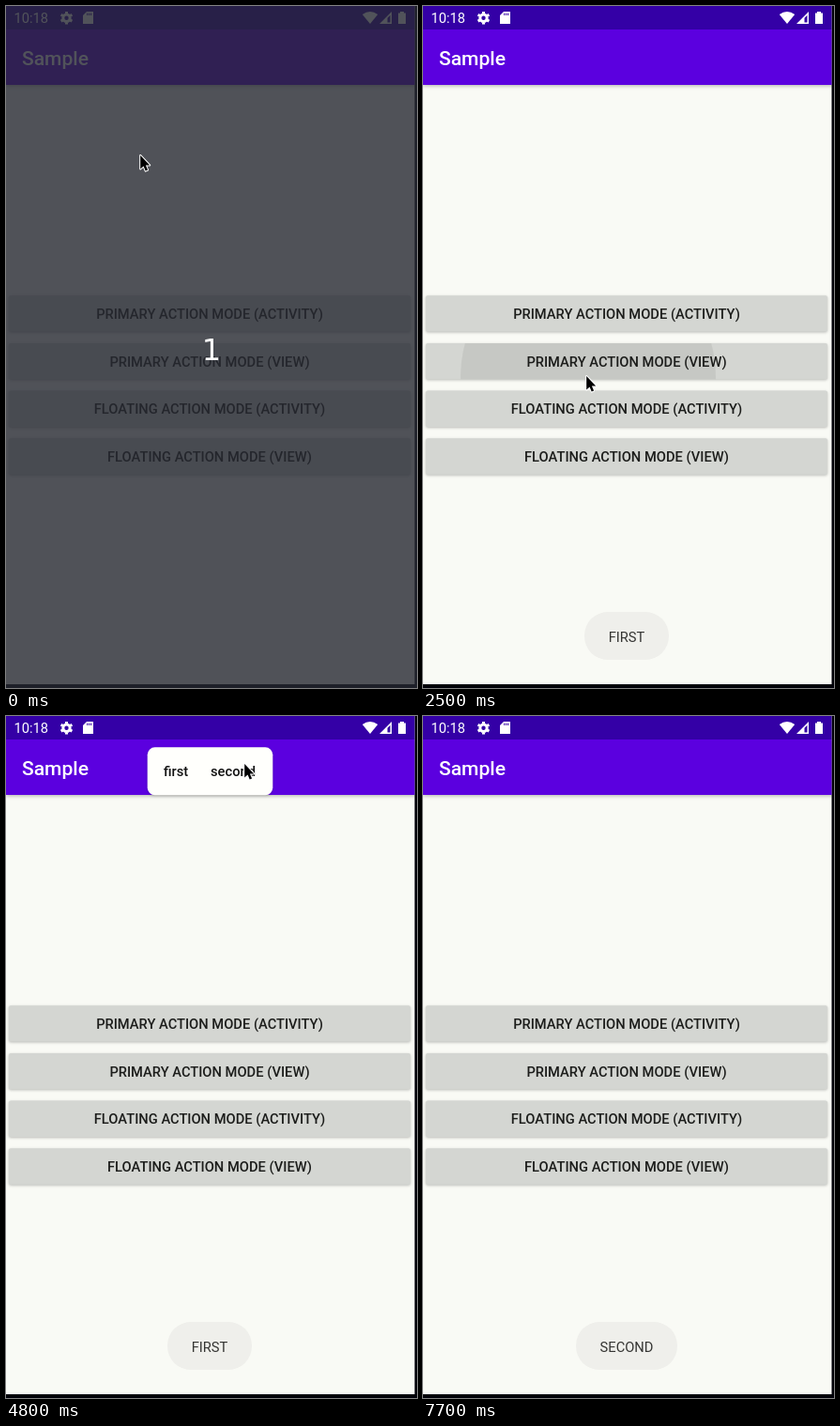
These frames come from a looping animation (438x726 px, 7800 ms). An HTML page with a canvas:

```html
<!DOCTYPE html>
<html lang="en">
<head>
<meta charset="utf-8">
<title>Action mode sample</title>
<style>
  html, body { margin: 0; width: 438px; height: 726px; overflow: hidden; background: #000; }
  canvas { display: block; }
</style>
</head>
<body>
<canvas id="stage" width="438" height="726"></canvas>
<script>
const LOOP = 7800, STEP = 100;
const WIDTH = 435.5, CENTER = 217;
const DP = 1.056;
const BUTTONS = ['PRIMARY', 'FLOATING'].flatMap(kind =>
  ['ACTIVITY', 'VIEW'].map(host => `${kind} ACTION MODE (${host})`));
const buttonTop = i => 308.2 + i * 48 * DP;
const g = document.getElementById('stage').getContext('2d');

// Each pointer move: start, end, x, y of the stop it reaches
const START = { x: 142, y: 158 };
const MOVES = [
  [200, 500, 135, 324],
  [1100, 1300, 215, 38],
  [1500, 1600, 351, 52],
  [2000, 2400, 173, 393],
  [2900, 3100, 353, 80],
  [3500, 3800, 298, 424],
  [4400, 4600, 295, 78],
  [4600, 4800, 253, 50],
  [5100, 5400, 222, 484],
  [6000, 6200, 178, 419],
  [6500, 6900, 406, 6],
  [7000, 7200, 291, 12],
  [7300, 7600, 6, 0],
];

const BACK = new Path2D('M20 12H5M12.7 4.7L5.4 12l7.3 7.3');
const CHECK = new Path2D('M4.1 12.7L9 17.6L20.3 6.3');
const CLOSE = new Path2D('M5.7 5.7L18.3 18.3M18.3 5.7L5.7 18.3');
const CARD = new Path2D('M86 6h7v13h-11v-9z');
const WIFI = new Path2D('M388 19L379.8 9Q388 3 396.2 9z');
const SIGNAL = new Path2D('M411 6V19H398zM409.5 9.8L406.5 12.8V17.5H409.5z');
const BATTERY = new Path2D('M420 6h4v1.5h2V19h-8V7.5h2z');
const ARROW = new Path2D('M0 0V14.4L3.4 11.4L5.5 16.6L7.9 15.6L5.7 10.4H10z');

const ramp = (t, a, b) => Math.min(1, Math.max(0, (t - a) / (b - a)));
const pulse = (t, a, b, c, d) => ramp(t, a, b) * (1 - ramp(t, c, d));
const easeOut = k => 1 - (1 - k) ** 3;

function layer(alpha, draw) {
  if (alpha <= 0) return;
  g.save();
  g.globalAlpha *= alpha;
  draw();
  g.restore();
}

function rect(color, x, y, w, h, r = 0) {
  g.fillStyle = color;
  g.beginPath();
  g.roundRect(x, y, w, h, r);
  g.fill();
}

function raised(blur, alpha, draw) {
  g.save();
  g.shadowColor = `rgba(0,0,0,${alpha})`;
  g.shadowBlur = blur;
  g.shadowOffsetY = 1;
  draw();
  g.restore();
}

function disc(color, x, y, r) {
  g.fillStyle = color;
  g.beginPath();
  g.arc(x, y, r, 0, 7);
  g.fill();
}

function clippedDisc(color, x, y, r, box) {
  g.save();
  g.beginPath();
  g.roundRect(...box);
  g.clip();
  disc(color, x, y, r);
  g.restore();
}

function text(str, x, y, color, { size = 14.7, weight = 500, align = 'left', family = 'Roboto' } = {}) {
  g.font = `${weight} ${size}px ${family}, sans-serif`;
  g.textAlign = align;
  g.fillStyle = color;
  g.fillText(str, x, y);
}

function lineIcon(path, x) {
  g.save();
  g.translate(x, 42);
  g.scale(DP, DP);
  g.lineWidth = 2;
  g.strokeStyle = '#fff';
  g.stroke(path);
  g.restore();
}

function gear(x, y) {
  g.strokeStyle = '#fff';
  g.lineWidth = 3;
  g.beginPath();
  g.arc(x, y, 3.7, 0, 7);
  for (let i = 0; i < 6; i++) {
    const a = Math.PI * (i / 3 + 1 / 6), c = Math.cos(a), s = Math.sin(a);
    g.moveTo(x + 4 * c, y + 4 * s);
    g.lineTo(x + 6.8 * c, y + 6.8 * s);
  }
  g.stroke();
}

function statusBar() {
  const color = '#3400a6';
  rect(color, 0, 0, WIDTH, 25);
  text('10:18', 8.4, 18, '#fff', { weight: 400 });
  gear(64.5, 12.7);
  g.fillStyle = '#fff';
  for (const shape of [CARD, WIFI, SIGNAL, BATTERY]) g.fill(shape, 'evenodd');
  for (let i = 0; i < 3; i++) rect(color, 86.2 + i * 2, 7.4, 1, 2.6);
}

function actionBar(alpha, pressed) {
  layer(alpha, () => {
    rect('#2d2d2b', 0, 25, WIDTH, 59);
    rect('#25cba9', 0, 81.7, WIDTH, 2.5);
    disc(`rgba(255,255,255,${0.14 * pressed})`, 358, 54.5, 20);
    lineIcon(BACK, 15);
    lineIcon(CHECK, 345);
    lineIcon(CLOSE, 396);
  });
}

function button(i) {
  raised(3, 0.25, () => rect('#d4d6d2', 3, buttonTop(i), 428, 38.4, 2));
}

function ripple(t, start, i, x) {
  const y = buttonTop(i);
  layer(pulse(t, start, start + 50, start + 200, start + 300), () =>
    clippedDisc('rgba(0,0,0,.065)', x, y + 36, 1.36 * (t - start), [3, y, 428, 38.4, 2]));
}

function toolbar(t, shown, pressed, top, x) {
  const box = [150.7, top, 133.6, 51, 8];
  const ink = 0.065 * pulse(t, pressed - 100, pressed, pressed + 100, pressed + 300);
  layer(pulse(t, shown, shown + 200, pressed + 100, pressed + 350), () => {
    raised(3, 0.18, () => rect('#fffffc', ...box));
    clippedDisc(`rgba(0,0,0,${ink})`, x, top + 25.5, 17 + 20 * ramp(t, pressed, pressed + 200), box);
    text('first', 168, top + 31, '#111');
    text('second', 218, top + 31, '#111');
  });
}

function toast(alpha, label, width) {
  layer(alpha, () => {
    rect('#efefeb', CENTER - width / 2, 645, width, 51, 25);
    text(label, CENTER, 677, '#353533', { weight: 400, align: 'center' });
  });
}

function pointer(t) {
  let { x, y } = START;
  for (const [start, end, toX, toY] of MOVES) {
    const k = easeOut(ramp(t, start, end));
    x += (toX - x) * k;
    y += (toY - y) * k;
  }
  g.save();
  g.translate(x + 1.2, y + 1);
  g.lineJoin = 'round';
  g.lineWidth = 2;
  g.strokeStyle = '#fff';
  g.stroke(ARROW);
  g.fillStyle = '#000';
  g.fill(ARROW);
  g.restore();
}

function draw(t) {
  rect('#000008', 0, 0, 438, 726);
  rect('#f9faf5', 0, 0, WIDTH, 722);
  raised(4, 0.3, () => rect('#5b00df', 0, 25, WIDTH, 59));
  statusBar();
  text('Sample', 16.9, 63, '#fff', { size: 20 * DP });

  BUTTONS.forEach((label, i) => button(i));
  ripple(t, 500, 0, 137);
  ripple(t, 2400, 1, 176);
  ripple(t, 3900, 2, 299);
  ripple(t, 5600, 3, 223);
  BUTTONS.forEach((label, i) =>
    text(label, CENTER, buttonTop(i) + 24.8, '#1c1d1b', { align: 'center' }));

  actionBar(pulse(t, 700, 1110, 1800, 2200), pulse(t, 1600, 1700, 1800, 2000));
  actionBar(pulse(t, 2600, 3010, 3300, 3700), pulse(t, 3100, 3200, 3300, 3500));

  toast(pulse(t, 2000, 2450, 4100, 4500), 'FIRST', 90);
  toast(pulse(t, 4100, 4500, 6200, 6600), 'FIRST', 90);
  toast(ramp(t, 6050, 6470), 'SECOND', 108);

  toolbar(t, 4200, 5000, 33.3, 253);
  toolbar(t, 5700, 6300, 394.6, 177);

  if (t < 100) {
    rect('rgba(38,40,49,.8)', 0, 0, 438, 726);
    text('1', 219, 377, '#fff', { size: 32, weight: 400, align: 'center', family: '"DejaVu Sans"' });
  }
  if (t < 7700) pointer(t);
}

const begin = performance.now();
function tick() {
  const t = (performance.now() - begin) % LOOP;
  draw(Math.floor(t / STEP) * STEP);
  requestAnimationFrame(tick);
}
tick();
</script>
</body>
</html>
```
